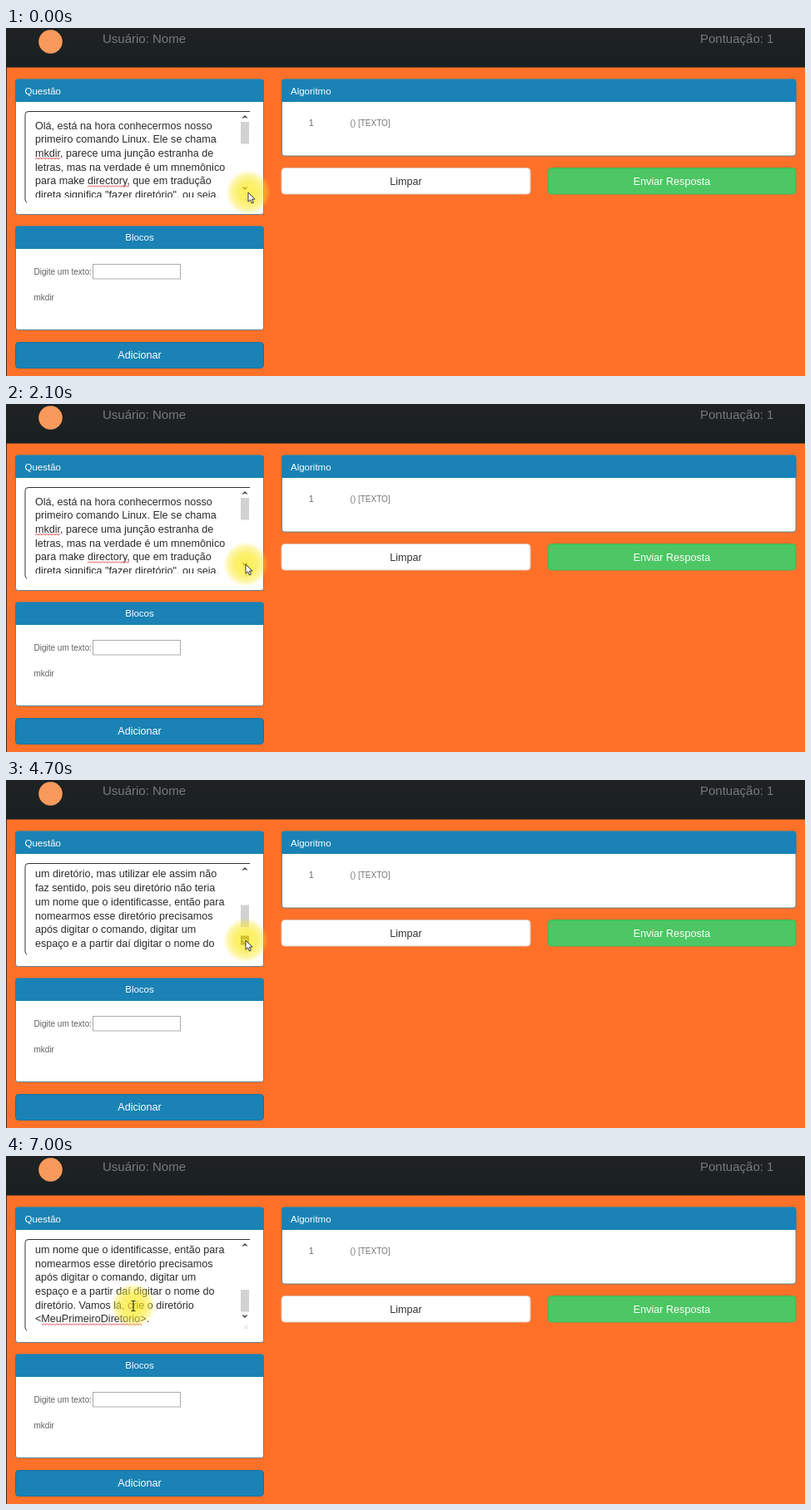
Recreate the animation shown at these times as an HTML page. Size 960 by 419 pixels, loop 7.1 s.

```html
<!DOCTYPE html>
<html lang="pt-BR">
<head>
<meta charset="utf-8">
<title>Questão</title>
<style>
  html, body { margin: 0; width: 100%; height: 100%; overflow: hidden; background: #ff7129; }
  svg { display: block; width: 960px; height: 419px; font-family: "Liberation Sans", Arial, sans-serif; }
  .blue { fill: #1a82b4; }
  .panel { fill: #fff; stroke: #5f7f90; }
  .title { font-size: 11.5px; fill: #fff; }
  .label { font-size: 12.6px; fill: #fff; text-anchor: middle; }
  .body { font-size: 12.6px; fill: #2b2b2b; }
  .small { font-size: 10px; fill: #606060; }
  .nav { font-size: 15px; fill: #777a7b; }
  .line { fill: none; stroke: #333; }
  .wave { fill: none; stroke: #e8444a; stroke-width: .9; }
</style>
</head>
<body>
<svg viewBox="0 0 960 419">
  <defs>
    <linearGradient id="bar" x2="0" y2="1">
      <stop stop-color="#1f2223"/><stop offset="1" stop-color="#192022"/>
    </linearGradient>
    <radialGradient id="halo">
      <stop stop-color="#fbe912" stop-opacity=".72"/>
      <stop offset=".5" stop-color="#fbe81a" stop-opacity=".62"/>
      <stop offset=".78" stop-color="#fbe82a" stop-opacity=".4"/>
      <stop offset="1" stop-color="#fbe830" stop-opacity="0"/>
    </radialGradient>
    <clipPath id="view"><rect x="30" y="108" width="250" height="96"/></clipPath>
  </defs>

  <rect width="960" height="419" fill="#ff7129"/>
  <rect y="47" width="1" height="372" fill="#4a2a1a"/>
  <rect width="960" height="47.5" fill="url(#bar)"/>
  <circle cx="53.5" cy="16.5" r="14.3" fill="#f79a5b"/>
  <text class="nav" x="116" y="18">Usuário: Nome</text>
  <text class="nav" x="834" y="18">Pontuação: 1</text>

  <rect class="panel" x="11.5" y="62" width="298" height="162.5" rx="3"/>
  <path class="blue" d="M11 89V65q0-3.500 3.500-3.500H306.500q3.500 0 3.500 3.500V89z"/>
  <text class="title" x="22.500" y="79.500">Questão</text>

  <rect class="panel" x="331.500" y="62" width="617.500" height="92" rx="3"/>
  <path class="blue" d="M331 89V65q0-3.500 3.500-3.500H946q3.500 0 3.500 3.500V89z"/>
  <text class="title" x="342" y="79.500">Algoritmo</text>
  <text class="small" x="364" y="118">1</text>
  <text class="small" x="413.500" y="118" style="fill:#777">() [TEXTO]</text>

  <rect x="331" y="168.500" width="299" height="31.500" rx="4" fill="#fff" stroke="#d8c8bf"/>
  <text class="label" x="480.500" y="189" style="fill:#333">Limpar</text>
  <rect x="651" y="168.500" width="298" height="31.500" rx="4" fill="#4cc763" stroke="#45b559"/>
  <text class="label" x="800" y="189">Enviar Resposta</text>

  <rect class="panel" x="11.500" y="239" width="298" height="124.500" rx="3"/>
  <path class="blue" d="M11 266V242q0-3.500 3.500-3.500H306.500q3.500 0 3.500 3.500V266z"/>
  <text class="title" x="160.500" y="256" text-anchor="middle">Blocos</text>
  <text class="small" x="33.500" y="297">Digite um texto:</text>
  <rect x="104.500" y="284.500" width="105" height="17.500" fill="#fff" stroke="#aaa"/>
  <text class="small" x="33.500" y="327.500">mkdir</text>

  <rect x="11.500" y="378.500" width="298" height="31" rx="4" class="blue" stroke="#19709a"/>
  <text class="label" x="160.500" y="398">Adicionar</text>

  <path class="line" d="M25.500 210q-2.500-.5-2.500-4V104.500q0-4 4-4H293"/>
  <path d="M286 208l4-4M289 208l1.500-1.500" stroke="#bbb" stroke-width=".8"/>
  <g clip-path="url(#view)"><g id="page" class="body"></g></g>

  <rect id="thumb" x="282" y="113" width="10" height="26.500" fill="#d2d2d2"/>
  <path class="line" d="M284.500 108.500l2.500-2.500 2.500 2.500" stroke-width="1.400"/>
  <rect id="press" x="282" y="187.500" width="10" height="11" fill="#666"/>
  <path id="down" class="line" d="M284.500 191.500l2.500 2.500 2.500-2.500" stroke-width="1.400"/>

  <g id="mouse">
    <circle r="27" fill="url(#halo)"/>
    <path id="arrow" d="M0 0V11.200L2.600 8.800 4.400 13 6.300 12.200 4.500 8.100H8z" fill="#fff" stroke="#222" stroke-width=".9"/>
    <path id="beam" class="line" d="M-2.500-5.500H-.5L0-5 .5-5.500H2.500M0-5V6M-2.500 6.500H-.5L0 6 .5 6.500H2.500" stroke-width="1.200"/>
  </g>
</svg>
<script>
const LOOP = 7100, FRAME = 100, ROW = 16.7, BASE = 121.5;
const $ = id => document.getElementById(id);

const lines = [
  'Olá, está na hora conhecermos nosso',
  'primeiro comando Linux. Ele se chama',
  'mkdir, parece uma junção estranha de',
  'letras, mas na verdade é um mnemônico',
  'para make directory, que em tradução',
  'direta significa "fazer diretório", ou seja,',
  'esse comando é responsável por criar',
  'um diretório, mas utilizar ele assim não',
  'faz sentido, pois seu diretório não teria',
  'um nome que o identificasse, então para',
  'nomearmos esse diretório precisamos',
  'após digitar o comando, digitar um',
  'espaço e a partir daí digitar o nome do',
  'diretório. Vamos lá, crie o diretório',
  '<MeuPrimeiroDiretorio>.'
];

function add(tag, attrs, text = '') {
  const el = document.createElementNS('http://www.w3.org/2000/svg', tag);
  for (const k in attrs) el.setAttribute(k, attrs[k]);
  el.textContent = text;
  return $('page').appendChild(el);
}

const rowY = i => BASE + ROW * i;

// Spell-check underline below part of a row
function wave(row, from, to) {
  let d = `M${from} ${rowY(row) + 3}`;
  for (let x = from, up = true; x < to; x += 2, up = !up) d += `l2 ${up ? -1.6 : 1.6}`;
  add('path', { class: 'wave', d });
}

lines.forEach((s, i) => add('text', { x: 35, y: rowY(i) }, s));
wave(2, 35, 65);
wave(4, 98, 147);
wave(14, 43, 162);
const caret = add('rect', { x: 173, y: rowY(14) - 11, width: 1, height: 13.5, fill: '#222' });

// Keys: [time, ...values]
const path = [
  [0, 291, 198], [400, 322, 224], [600, 322, 224], [1200, 341, 235], [1400, 313, 239],
  [2000, 288, 193], [6200, 288, 193], [6400, 260, 186], [6700, 190, 172],
  [6800, 166, 172], [6900, 150, 176], [7000, 153, 180]
];
const scroll = [
  [0, 0], [2200, 0], [2400, 21], [2600, 21], [2800, 54], [3000, 54], [3200, 87.5],
  [4600, 87.5], [4700, 121], [5100, 121], [5300, 154.8], [LOOP, 154.8]
];
const presses = [2300, 2700, 3100, 4700, 5200];

function at(keys, t) {
  const n = keys.findIndex(k => k[0] > t);
  if (n < 0) return keys[keys.length - 1].slice(1);
  const a = keys[n - 1], b = keys[n], p = (t - a[0]) / (b[0] - a[0]);
  return a.slice(1).map((v, i) => v + (b[i + 1] - v) * p);
}

const show = (el, on) => el.setAttribute('visibility', on ? 'visible' : 'hidden');

function draw(now) {
  const t = Math.floor(now % LOOP / FRAME) * FRAME;
  const [x, y] = at(path, t), [s] = at(scroll, t);
  $('page').setAttribute('transform', `translate(0 ${-s})`);
  $('thumb').setAttribute('y', 113 + s * .31);
  $('mouse').setAttribute('transform', `translate(${x} ${y})`);

  const typing = x > 23 && x < 281 && y > 100 && y < 210;
  show($('arrow'), !typing);
  show($('beam'), typing);

  const held = presses.some(p => t >= p && t < p + 200);
  show($('press'), held);
  $('down').style.stroke = held ? '#fff' : '#333';
  show(caret, (t + 1000 - 140) % 1060 < 530 !== true);
  requestAnimationFrame(draw);
}
requestAnimationFrame(draw);
</script>
</body>
</html>
```
